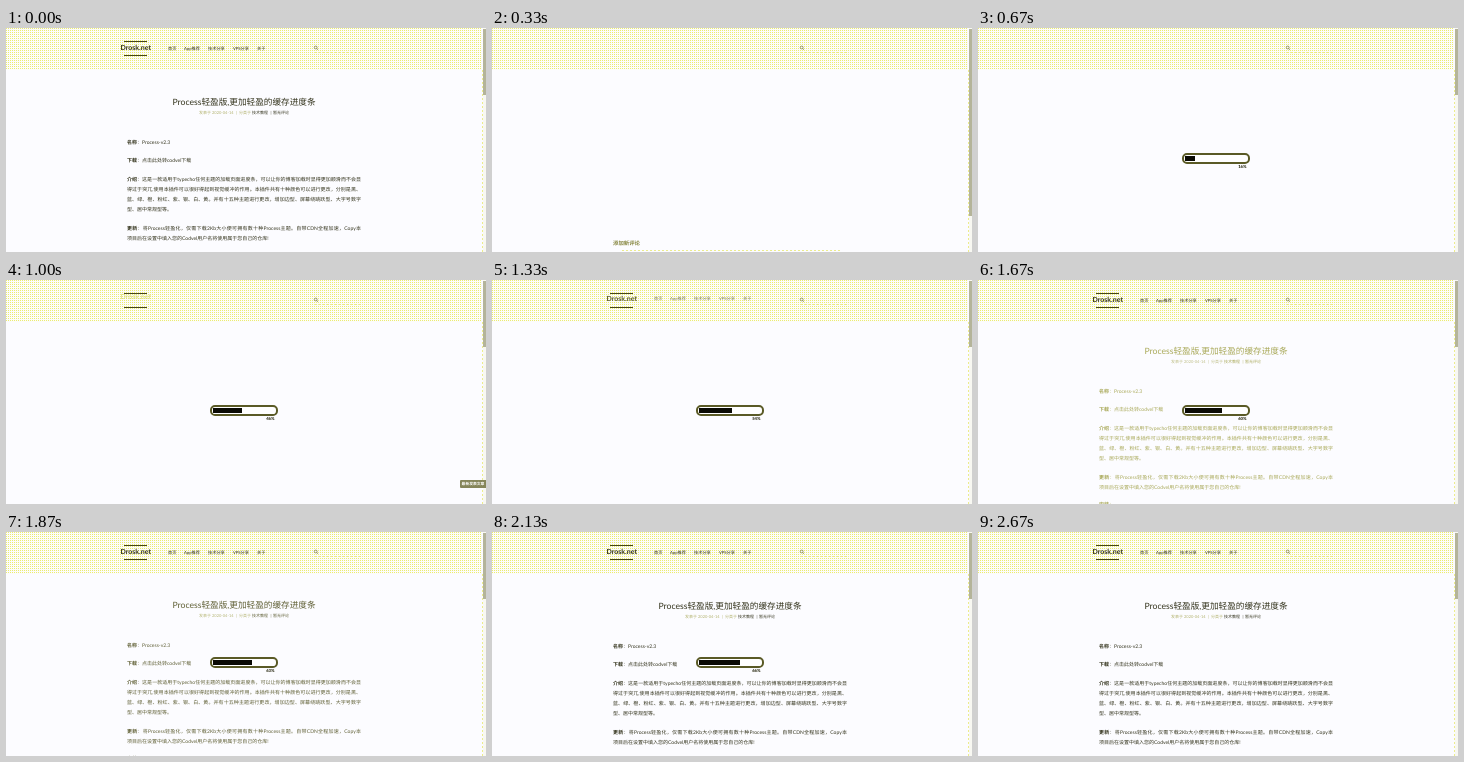
An HTML page for the animation above (2740 ms loop, 480x224 px).

```html
<!DOCTYPE html>
<html lang="zh-CN">
<head>
<meta charset="utf-8">
<title>Process</title>
<style>
@property --p { syntax: "<integer>"; inherits: true; initial-value: 0; }

html, body { margin: 0; width: 100%; height: 100%; overflow: hidden; }
body {
  position: relative;
  background: #fcfcff;
  color: #33331c;
  font: 5px/10px Lato, "Noto Sans CJK SC", "Noto Sans CJK", sans-serif;
  text-rendering: geometricPrecision;
  --loop: 2740ms linear infinite;
  --cut: 2740ms step-end infinite;
  --dash: #ecec8c 0 2px, transparent 2px 4px;
}
body *, .bar::after { position: absolute; white-space: nowrap; box-sizing: border-box; }
p, h1 { margin: 0; font-weight: 400; }
b { position: static; }

header {
  inset: 0 4px auto 0;
  height: 42px;
  background: conic-gradient(transparent 75%, #ecec70 0) 0 0 / 2px 2px #fcfcfa;
}
.edge { left: 476px; top: 42px; width: 1px; height: 182px; background: repeating-linear-gradient(var(--dash)); }
.track { left: 477px; top: 0; width: 3px; height: 224px; background: #f8f8f2; }
.thumb { left: 477px; top: 1px; width: 3px; height: 66px; background: #b4b49a; animation: thumb var(--cut); }
.rule { height: 1px; background: repeating-linear-gradient(90deg, var(--dash)); }
.search { left: 307px; top: 17px; }

.lines { left: 118px; top: 13px; width: 23px; height: 15px; border: solid #44441c; border-width: 1px 0; animation: lines var(--cut); }
.logo { left: 114.5px; top: 15px; font-size: 7px; font-weight: 700; animation: logo var(--loop); }
nav { inset: 0; font-size: 4.2px; animation: nav var(--loop); }
nav span { top: 16px; }

main { inset: 0; animation: post var(--loop); }
h1 { left: 0; top: 69px; width: 476px; text-align: center; font-size: 8.65px; }
.meta span { top: 80px; font-size: 4px; }
.meta .dim { color: #b0b06a; }
main p { left: 121px; width: 234px; }
.full { text-align-last: justify; }

.reply { inset: 0; animation: reply var(--cut); }
.reply b { position: absolute; left: 121px; top: 210.7px; font-size: 5.4px; color: #85853e; }

.bar {
  left: 204px; top: 125px; width: 68px; height: 11px;
  border: 2px solid #5a5a26; border-radius: 5px;
  background: #fff;
  animation: bar var(--cut), load var(--loop);
}
.bar div { left: 1px; top: 1px; height: 5px; width: calc(var(--p) * .62px); background: #0a0a04; }
.bar::after {
  counter-reset: p var(--p);
  content: counter(p) "%";
  right: 1.5px; top: 7px;
  font-size: 4.2px; font-weight: 900;
}
.tip {
  left: 453.5px; top: 200px; width: 27px; height: 7.5px;
  border-radius: 1px 0 0 1px;
  background: #85855a; color: #fff;
  font-size: 3.8px; font-weight: 700; line-height: 7.5px; text-align: center;
  animation: tip var(--cut);
}

@keyframes thumb { 0% { height: 66px } 7.3% { height: 187px } 19.4%, 100% { height: 66px } }
@keyframes reply { 0% { opacity: 0 } 7.3% { opacity: 1 } 19.4%, 100% { opacity: 0 } }
@keyframes lines { 0% { opacity: 1 } 7.3% { opacity: 0 } 31.6%, 100% { opacity: 1 } }
@keyframes tip { 0% { opacity: 0 } 29.2% { opacity: 1 } 43.8%, 100% { opacity: 0 } }
@keyframes bar { 0% { opacity: 0 } 21.9% { opacity: 1 } 92.6%, 100% { opacity: 0 } }
@keyframes load {
  0%, 21.9% { --p: 10 }
  36.5% { --p: 46 }
  55.8% { --p: 58 }
  77.8% { --p: 66 }
  87.7%, 100% { --p: 100 }
}
@keyframes logo {
  0%, 7.29% { opacity: 1; transform: none; color: #33331c }
  7.3%, 31.6% { opacity: 0; transform: translateY(-5px); color: #c8c850 }
  36.5% { opacity: .65; transform: translateY(-3px); color: #d2d264 }
  51%, 100% { opacity: 1; transform: none; color: #33331c }
}
@keyframes nav {
  0%, 7.29% { opacity: 1; transform: none }
  7.3%, 40% { opacity: 0; transform: translateY(-5px) }
  54%, 100% { opacity: 1; transform: none }
}
@keyframes post {
  0%, 7.29% { opacity: 1; transform: none; color: #33331c }
  7.3%, 48.7% { opacity: 0; transform: translateY(-9px); color: #d6d668 }
  55.8% { opacity: .75; transform: translateY(-4.5px); color: #c6c640 }
  68.2% { opacity: .95; transform: translateY(-.7px); color: #57572a }
  77.7%, 100% { opacity: 1; transform: none; color: #33331c }
}
</style>
</head>
<body>
<header></header>
<div class="edge"></div>
<div class="track"></div>
<div class="thumb"></div>

<svg class="search" width="7" height="7" fill="none" stroke="#85854c" stroke-width=".8">
  <circle cx="2.7" cy="2.5" r="1.4"/>
  <path d="M3.7 3.5 5 4.8"/>
</svg>
<div class="rule" style="left:308px;top:24px;width:49px"></div>

<div class="lines"></div>
<div class="logo">Drosk.net</div>
<nav>
  <span style="left:162px">首页</span>
  <span style="left:178px">App推荐</span>
  <span style="left:202px">技术分享</span>
  <span style="left:227px">VPS分享</span>
  <span style="left:251px">关于</span>
</nav>

<main>
  <h1>Process轻盈版,更加轻盈的缓存进度条</h1>
  <div class="meta">
    <span class="dim" style="left:193px">发表于 2020-04-14</span>
    <span class="dim" style="left:230px">|</span>
    <span class="dim" style="left:233px">分类于</span>
    <span style="left:246px">技术教程</span>
    <span style="left:264.5px">|</span>
    <span style="left:267px">暂无评论</span>
  </div>
  <p style="top:109.5px"><b>名称</b>：Process-v2.3</p>
  <p style="top:128px"><b>下载</b>：点击此处转codvel下载</p>
  <p class="full" style="top:146.5px"><b>介绍</b>：这是一款适用于typecho任何主题的加载页面进度条，可以让你的博客加载时显得更加顺滑而不会显</p>
  <p class="full" style="top:156.5px">得过于突兀,使用本插件可以很好得起到视觉缓冲的作用。本插件共有十种颜色可以进行更改，分别是黑、</p>
  <p class="full" style="top:166.5px">蓝、绿、橙、粉红、紫、银、白、黄。并有十五种主题进行更改，增加边型、屏幕绕跳跃型、大字号数字</p>
  <p style="top:176.5px">型、居中常规型等。</p>
  <p class="full" style="top:195.5px"><b>更新</b>：将Process轻盈化，仅需下载2Kb大小便可拥有数十种Process主题。自带CDN全程加速，Copy本</p>
  <p style="top:205.5px">项目后在设置中填入您的Codvel用户名将使用属于您自己的仓库!</p>
  <p style="top:223px"><b>安装</b>：</p>
</main>

<div class="reply">
  <b>添加新评论</b>
  <div class="rule" style="left:130px;top:222px;width:220px"></div>
</div>

<div class="bar"><div></div></div>
<div class="tip">最新发表文章</div>
</body>
</html>
```
